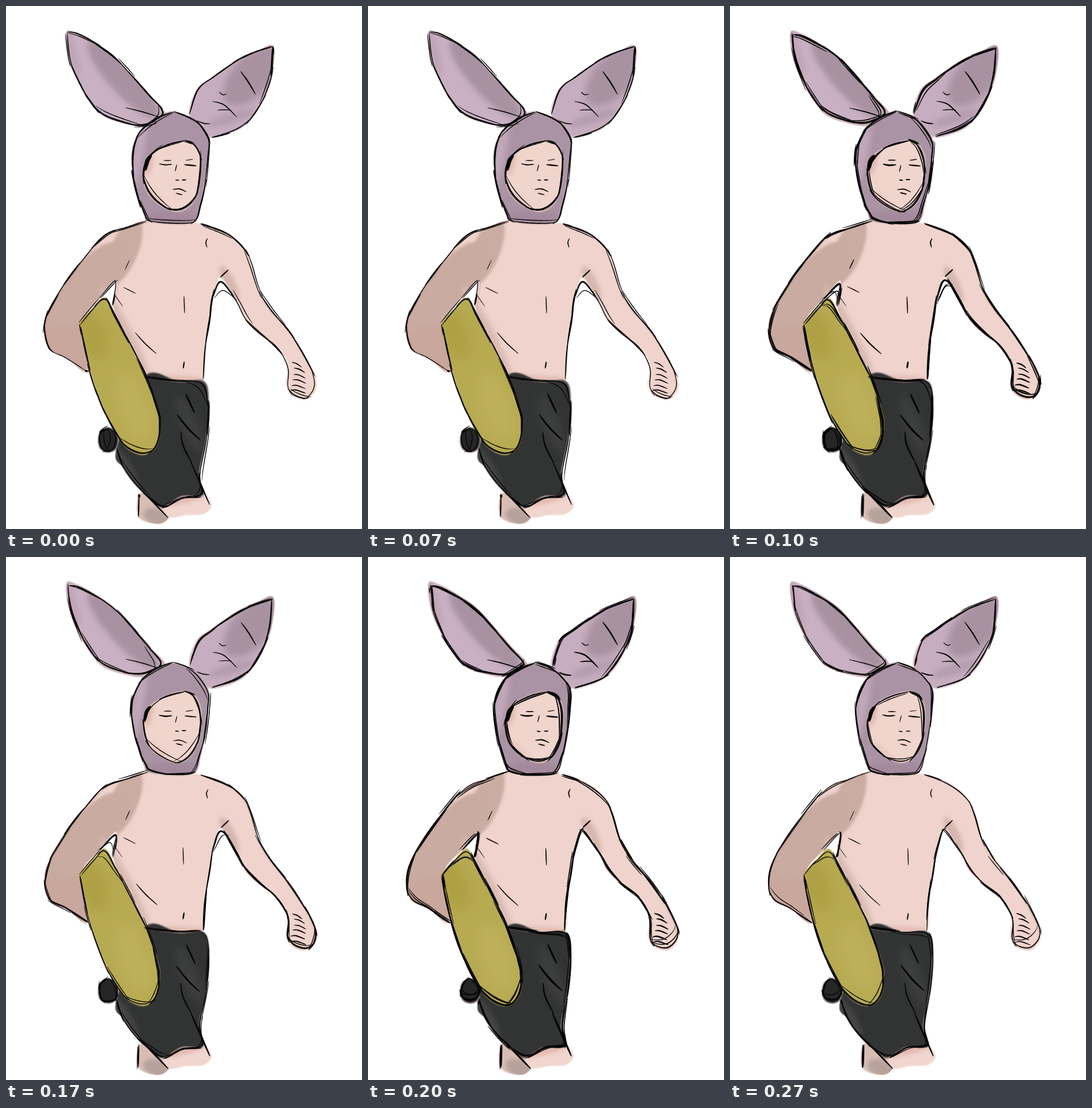
These frames come from a looping animation (618 by 907 pixels, 300 ms). An HTML page with a canvas:

```html
<!DOCTYPE html>
<html lang="en">
<head>
<meta charset="utf-8">
<title>Sketch loop</title>
<style>
html, body { margin: 0; height: 100%; overflow: hidden; background: #fff; }
canvas { display: block; }
</style>
</head>
<body>
<canvas id="stage" width="618" height="907"></canvas>
<script>
const stage = document.getElementById('stage');
const ctx = stage.getContext('2d');
const paint = stage.cloneNode();
const pc = paint.getContext('2d');

const points = text => text.split(' ').map(p => p.split(',').map(Number));

function random(seed) {
  return () => {
    seed = (seed + 0x6D2B79F5) | 0;
    let t = Math.imul(seed ^ seed >>> 15, 1 | seed);
    t = t + Math.imul(t ^ t >>> 7, 61 | t) ^ t;
    return ((t ^ t >>> 14) >>> 0) / 4294967296;
  };
}

// Catmull-Rom curve through the points, sampled about every 2 px
function curve(p, closed) {
  const n = p.length, out = [];
  const at = i => closed ? p[(i + n) % n] : p[Math.max(0, Math.min(n - 1, i))];
  for (let i = 0; i < (closed ? n : n - 1); i++) {
    const [a, b, c, d] = [at(i - 1), at(i), at(i + 1), at(i + 2)];
    const steps = Math.ceil(Math.hypot(c[0] - b[0], c[1] - b[1]) / 2);
    for (let s = 0; s < steps; s++) {
      const t = s / steps;
      out.push([0, 1].map(k => b[k] + t / 2 * (c[k] - a[k] +
        t * (2 * a[k] - 5 * b[k] + 4 * c[k] - d[k] + t * (3 * (b[k] - c[k]) + d[k] - a[k])))));
    }
  }
  out.push(at(closed ? 0 : n - 1));
  return out;
}

// Parts from back to front. runs: stretches of the outline that get ink;
// shades: x, y, radii, angle in degrees, colour, blur; inset: how far later drawings shrink
const parts = [
  { color: '#d9bdb5', at: '231,846 252,852 274,870 283,886 264,898 230,886', runs: [[5, 6]],
    shades: [[262, 886, 24, 14, 20, '#b7a19b', 3]] },
  { color: '#f0d6cf', at: '273,869 304,852 343,849 357,866 343,881 312,883 284,887', runs: [],
    shades: [[310, 857, 40, 5, -14, '#e3b5ac', 3]] },
  { color: '#efd3cc', runs: [[0, 8], [10, 12], [16, 39]],
    at: '246,372 210,384 172,397 135,438 95,492 68,545 73,592 105,610 142,634 130,552 ' +
      '162,508 192,476 186,520 214,590 244,645 300,650 342,648 345,595 353,545 360,500 ' +
      '373,470 402,515 416,543 440,567 468,588 484,610 492,632 489,660 500,677 522,682 ' +
      '538,665 536,642 515,600 490,562 458,525 438,490 425,445 410,415 380,392 337,377',
    shades: [[205, 425, 24, 62, 22, '#caaca2', 2], [125, 510, 38, 120, 35, '#caaba1', 2],
      [110, 595, 50, 42, 20, '#c9a79d', 4], [208, 570, 12, 95, -27, '#d8bab1', 4],
      [388, 482, 10, 34, -25, '#d5b7ae', 3], [300, 647, 48, 6, 2, '#e2bcb2', 3]] },
  { color: '#323333', runs: [[0, 12]],
    at: '240,643 300,651 344,651 352,690 348,750 336,812 343,848 305,851 273,869 252,856 226,832 203,800 192,768',
    shades: [[318, 725, 15, 55, -22, '#3d3e3e', 7], [208, 800, 10, 40, -30, '#464646', 5]] },
  { color: '#262627', at: '177,731 191,738 195,753 190,769 177,774 164,768 160,753 164,738', runs: [[0, 8]], shades: [] },
  { color: '#b7aa51', runs: [[0, 16]],
    at: '128,552 150,525 172,506 190,538 218,592 244,645 264,705 267,725 263,758 250,775 231,778 206,763 180,724 160,678 144,628 134,585',
    shades: [[150, 570, 24, 45, -20, '#aea044', 9], [222, 695, 24, 65, -18, '#beb15b', 14]] },
  { color: '#c9b0c2', inset: .045, runs: [[0, 14]],
    at: '105,46 122,47 152,63 188,88 222,125 250,157 276,185 262,198 236,208 200,202 168,190 148,168 128,135 110,92',
    shades: [[203, 127, 88, 24, 48, '#a892a2', 5], [112, 78, 10, 45, -18, '#bea4b6', 5]] },
  { color: '#c6adbf', inset: .03, runs: [[0, 5], [7, 12]],
    at: '464,70 435,79 400,95 357,125 331,145 318,188 340,212 357,228 400,216 425,196 446,162 461,120',
    shades: [[428, 120, 66, 34, -48, '#a892a2', 6], [392, 194, 42, 9, -18, '#b39daf', 4]] },
  { color: '#aa93a4', runs: [[0, 17]],
    at: '290,183 262,192 238,210 222,238 218,268 223,305 231,335 240,362 248,373 288,378 327,374 338,345 346,305 351,262 352,232 336,206 318,193',
    shades: [[230, 250, 10, 65, 10, '#c2a9bb', 6], [285, 368, 50, 12, 0, '#a3899b', 4]] },
  { color: '#f0d5cd', runs: [[0, 13]],
    at: '310,233 280,240 252,256 239,280 240,308 250,330 270,347 297,357 318,348 332,325 338,292 338,262 328,240',
    shades: [[247, 275, 6, 20, 15, '#dcb3a9', 4], [264, 340, 8, 28, -45, '#e6c8be', 4]] }
];
parts.forEach(part => part.p = points(part.at));

// Small marks: width and points
const marks = [
  [1.8, '207,177 236,184 265,193'], [2.4, '408,113 421,131 434,153'], [1.6, '370,148 376,153 383,152'],
  [2.1, '358,165 378,171 400,192'], [1.5, '368,181 380,180 392,181'], [2, '332,200 343,204 354,205'],
  [7, '252,259 245,269 241,286'],
  [2.4, '265,274 276,276 288,275'], [1.6, '274,268 288,268'], [2.4, '310,276 331,278'], [1.2, '312,268 325,266'],
  [1.4, '297,275 294,287'], [2, '293,301 300,302'], [2, '305,301 313,301'],
  [2, '290,318 302,317 314,322'], [1.8, '295,324 307,327'],
  [1.8, '351,402 348,409 350,418'], [1.5, '204,487 226,498'], [1.2, '207,457 215,440'], [1.8, '308,504 309,534'],
  [2.5, '309,617 307,629'], [1.8, '225,567 242,586 262,604'], [1, '187,499 203,522'], [2.2, '387,457 373,470'],
  [3, '312,672 328,706'], [3, '296,708 316,733 337,753'], [2.4, '303,738 307,762 322,792'],
  [3, '321,790 354,865'], [3, '232,835 282,887']
];
const strokes = marks.map(([w, at]) => [w, points(at)]);
// Fingers fan out from the knuckles
for (let i = 0; i < 6; i++) {
  const y = 618 + i * 10, x = 497 + 3 * Math.sin(i);
  strokes.push([2.1, [[x, y], [x + 9, y + 3 - i], [x + 17 + 2 * i, y + 9 - i]]]);
}

// Tapered brush mark; straighten pulls it towards its chord
function brush(c, line, width, dx = 0, dy = 0, straighten = 0) {
  const n = line.length - 1, a = line[0], b = line[n], left = [], right = [];
  if (n < 1) return;
  line.forEach((q, i) => {
    const t = i / n, p = line[Math.max(0, i - 1)], r = line[Math.min(n, i + 1)];
    const len = Math.hypot(r[0] - p[0], r[1] - p[1]) || 1;
    const half = width / 2 * (.25 + .75 * Math.sin(Math.PI * t) ** .6);
    const nx = (p[1] - r[1]) / len * half, ny = (r[0] - p[0]) / len * half;
    const x = q[0] + dx + straighten * (a[0] + (b[0] - a[0]) * t - q[0]);
    const y = q[1] + dy + straighten * (a[1] + (b[1] - a[1]) * t - q[1]);
    left.push([x + nx, y + ny]);
    right.unshift([x - nx, y - ny]);
  });
  c.beginPath();
  left.concat(right).forEach(q => c.lineTo(...q));
  c.fill();
}

function center(p) {
  return [0, 1].map(k => p.reduce((sum, q) => sum + q[k], 0) / p.length);
}

// Inked stretches of a part, shrunk about its centre
function outlines({ p, runs }, inset) {
  const mid = center(p);
  const small = p.map(q => q.map((v, k) => v + (mid[k] - v) * inset));
  return runs.map(([from, to]) => {
    const run = [];
    for (let i = from; i <= to; i++) run.push(small[i % p.length]);
    return curve(run);
  });
}

function paintPart({ p, color, shades }) {
  const path = new Path2D();
  curve(p, true).forEach(q => path.lineTo(...q));
  pc.save();
  pc.filter = 'blur(0.8px)';
  pc.fillStyle = color;
  pc.fill(path);
  pc.clip(path);
  for (const [x, y, rx, ry, angle, tone, blur] of shades) {
    pc.filter = `blur(${blur}px)`;
    pc.fillStyle = tone;
    pc.beginPath();
    pc.ellipse(x, y, rx, ry, angle * Math.PI / 180, 0, 7);
    pc.fill();
  }
  pc.restore();
}

parts.forEach(paintPart);
// Faint red pencil just inside the outlines
pc.fillStyle = '#c9908855';
parts.forEach(part => outlines(part, .015).forEach(line => brush(pc, line, 2)));

// Ink: overlapping dashes with thin loose doubles
function sketch(line, rnd, bold) {
  const sway = a => (rnd() * 2 - 1) * a;
  for (let i = 0; i < line.length;) {
    const n = Math.round(14 + rnd() * 26);
    const dash = line.slice(Math.max(0, i - 4), i + n + 4);
    brush(ctx, dash, (1.3 + rnd() * 2.2) * (bold ? 1.15 : 1), sway(1.1), sway(1.1), .2);
    if (rnd() < .75) brush(ctx, dash, 1.5, sway(3.5), sway(3.5), .6);
    const dx = sway(3), dy = sway(3);
    if (bold) brush(ctx, dash, 1.8, dx, dy, .5);
    i += n;
  }
}

function draw(pose, bold) {
  const rnd = random(pose * 997 + 5);
  const sway = a => (rnd() * 2 - 1) * a;
  ctx.fillStyle = '#fff';
  ctx.fillRect(0, 0, 618, 907);
  ctx.drawImage(paint, 0, 0);
  ctx.fillStyle = '#060606';
  parts.forEach((part, i) => {
    const inset = pose ? part.inset || 0 : 0;
    outlines(part, inset).forEach((line, k) => sketch(line, random(pose * 997 + i * 31 + k), bold));
  });
  strokes.forEach(([w, p]) =>
    brush(ctx, curve(p), w * (bold ? 1.15 : .95) * (.85 + rnd() * .3), sway(1), sway(1)));
}

// Three drawings, each first bold, then lighter
const bold = 30, hold = 100;
let shown;
function tick() {
  const t = performance.now() % (3 * hold);
  const pose = Math.floor(t / hold), heavy = t % hold < bold;
  const key = pose * 2 + heavy;
  if (key !== shown) {
    shown = key;
    draw(pose, heavy && pose > 0);
  }
  requestAnimationFrame(tick);
}
tick();
</script>
</body>
</html>
```
